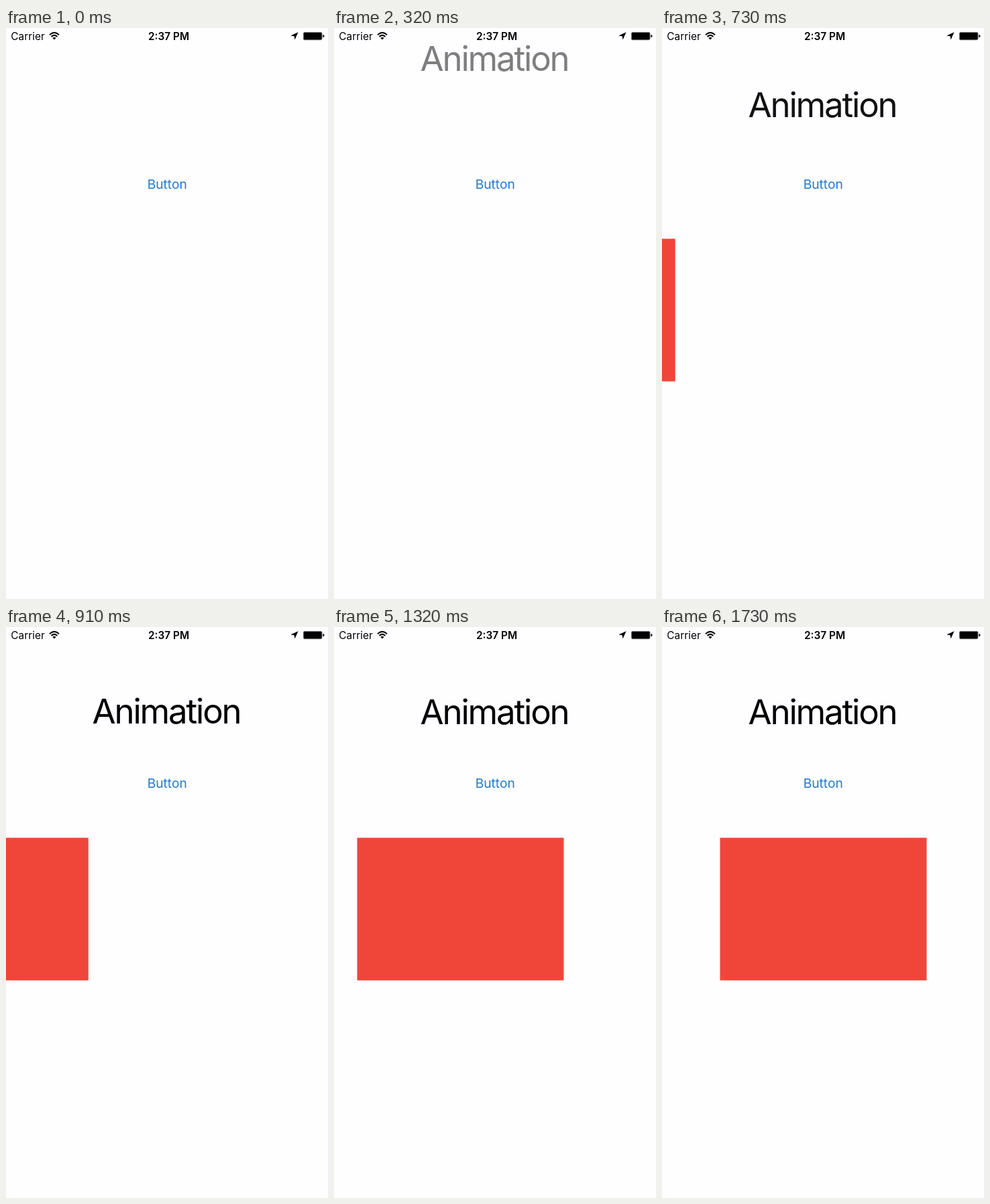
These frames come from a looping animation (480 by 852 pixels, 2490 ms). An HTML page:

```html
<!DOCTYPE html>
<html lang="en">
<head>
<meta charset="utf-8">
<title>Launch animation</title>
<style>
  html, body { margin: 0; width: 100%; height: 100%; overflow: hidden; background: #fefdff; }
  svg { display: block; width: 480px; height: 852px; }
  text {
    font-family: Inter, Roboto, "Liberation Sans", sans-serif;
    font-optical-sizing: none;
    text-anchor: middle;
  }
  .status { font-size: 15.4px; }
  .clock { font-weight: 600; }
  .button { font-size: 19.2px; fill: #1b7cd6; }
  #title { font-size: 51px; letter-spacing: -2.2px; }
</style>
</head>
<body>
<svg viewBox="0 0 480 852">
  <rect width="480" height="852" fill="#fefdff"/>
  <text id="title" x="239" y="145">Animation</text>
  <text class="button" x="240.2" y="239.6">Button</text>
  <rect id="box" y="314.5" width="308" height="212.8" fill="#f04639"/>

  <text class="status" x="32.5" y="17.5">Carrier</text>
  <g fill="none" stroke="#000" stroke-width="2">
    <path d="M65 10.2Q72 3.6 79 10.2"/>
    <path d="M67.6 12.9Q72 8.9 76.4 12.9"/>
  </g>
  <path d="M69.5 14.9Q72 12.6 74.5 14.9L72 17.5Z"/>
  <text class="status clock" x="242.6" y="17.5">2:37 PM</text>
  <path d="M435.6 6.2L430.4 17.4L429.6 12.2L424.2 11.6Z"/>
  <rect x="443.4" y="6.4" width="27.6" height="11.4" rx="1.8" fill="#000" stroke="#777" stroke-width=".8"/>
  <path d="M472.4 10Q474.6 10.4 474.6 12.1T472.4 14.2Z"/>
</svg>
<script>
  const LOOP = 2490;
  const FRAME = 1000 / 22;
  const DURATION = 1324;
  const TITLE = { start: -342, travel: 161, baseline: 145 };
  const BOX = { start: 298, travel: 480, x: 86.5 };

  const title = document.getElementById("title");
  const box = document.getElementById("box");

  // Ease in-out, cubic-bezier(.42, 0, .58, 1), solved by bisection.
  function ease(x) {
    if (x <= 0) return 0;
    if (x >= 1) return 1;
    let low = 0, high = 1;
    for (let i = 0; i < 24; i++) {
      const s = (low + high) / 2;
      if (s * (1.26 - 0.78 * s + 0.52 * s * s) < x) low = s;
      else high = s;
    }
    return low * low * (3 - 2 * low);
  }

  const progress = (time, start) => ease((time - start) / DURATION);

  function draw(time) {
    const step = Math.floor((time + 5) / FRAME);
    const now = step * FRAME;

    const drop = progress(now, TITLE.start);
    title.setAttribute("y", TITLE.baseline - TITLE.travel * (1 - drop));
    title.setAttribute("opacity", step ? drop : 0);

    const slide = progress(now, BOX.start);
    box.setAttribute("x", BOX.x - BOX.travel * (1 - slide));
  }

  const origin = performance.now();
  function tick() {
    draw((performance.now() - origin) % LOOP);
    requestAnimationFrame(tick);
  }
  tick();
</script>
</body>
</html>
```
